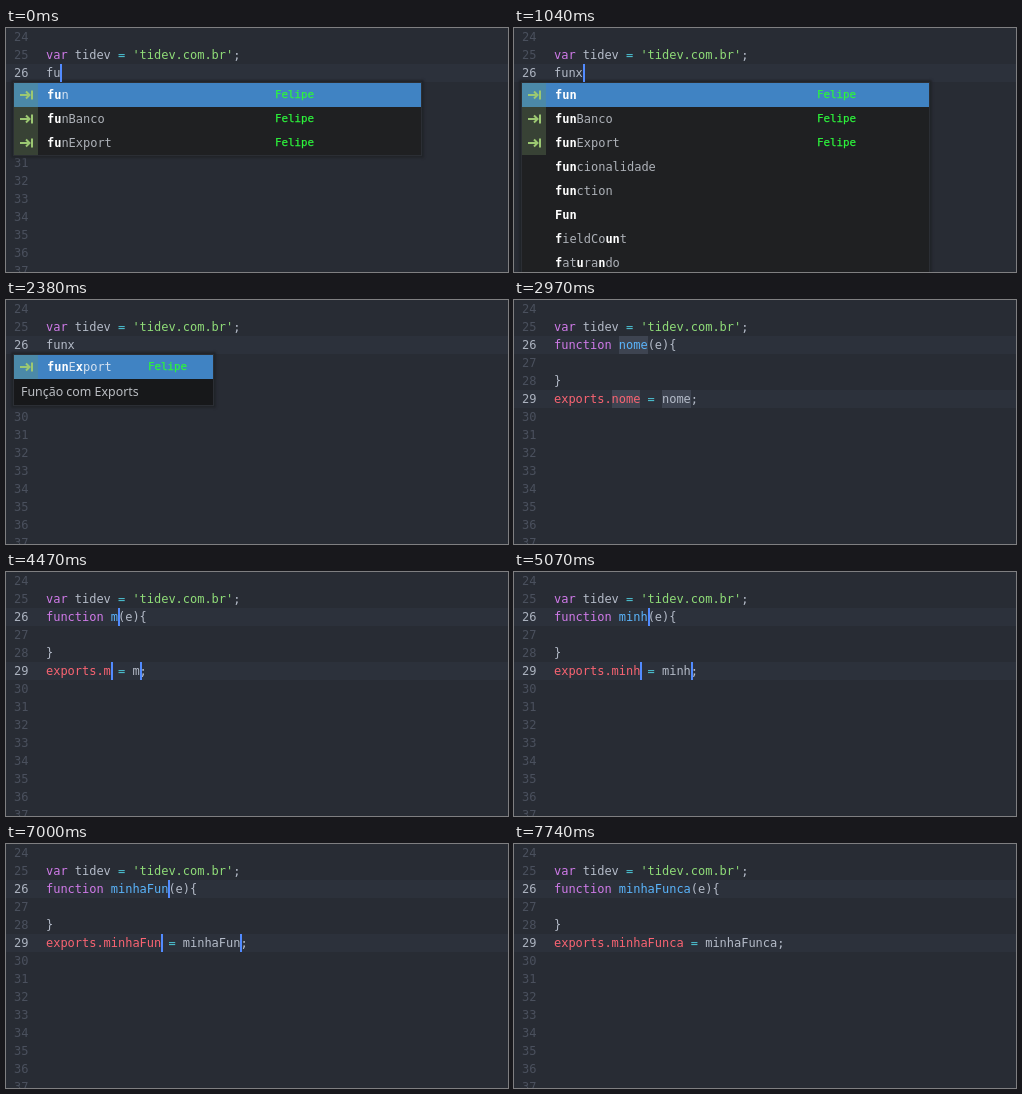
Write an HTML page that moves like this. It is 502 px wide and 244 px high and loops after 8 s.

```html
<!DOCTYPE html>
<html lang="pt-BR">
<head>
<meta charset="utf-8">
<title>Editor snippet</title>
<style>
  html, body { margin: 0; width: 100%; height: 100%; overflow: hidden; background: #282c34; }
  #stage {
    position: relative; width: 502px; height: 244px; overflow: hidden;
    background: #282c34; color: #b4bbc8;
    font: 12px/18px "DejaVu Sans Mono", monospace; letter-spacing: -.0246px; white-space: pre;
  }
  #stage div, .cursor, .sel { position: absolute; }
  .line { left: 0; width: 502px; height: 18px; }
  .active { background: #2c313b; }
  .num { left: 8px; color: #4a505d; }
  .active .num { color: #abb2bf; }
  .code { left: 40px; }
  .key { color: #cf7ae8; } .str { color: #8fdc78; } .op { color: #4cc2d2; }
  .fn { color: #5ab4fb; } .var { color: #f96472; }
  .sel { height: 18px; background: #3e4451; }
  .cursor { width: 2px; height: 18px; background: #528bff; }
  #popup {
    left: 8px; top: 55px; background: #1f2022;
    box-shadow: 0 0 0 1px #2b2e34, 0 0 2px 3px #212429;
  }
  .row { left: 0; width: 100%; height: 24px; line-height: 24px; color: #adb1b8; }
  .row b { color: #fff; }
  .picked { background: #4083c3; color: #d5e2f0; }
  .icon { left: 0; width: 24px; height: 24px; background: #384235; }
  .picked .icon { background: #4b89a8; }
  .icon svg { display: block; }
  .word { left: 33px; }
  .tag { color: #2df53c; font-size: 10.8px; letter-spacing: 0; -webkit-text-stroke: .25px; }
  .note {
    left: 0; top: 24px; width: 100%; height: 26px; background: #17181a; color: #babdc2;
    font: 12.4px/25px "Noto Sans", sans-serif; letter-spacing: 0; text-indent: 7px;
  }
</style>
</head>
<body>
<div id="stage"><div id="lines"></div><div id="popup"></div><div id="cursors"></div></div>
<script>
const LOOP = 8000, CHAR = 7.2, LEFT = 40, ROW = 18, FIRST = 24;
const AUTHOR = 'Felipe';
const WORDS = ['fun', 'funBanco', 'funExport', 'funcionalidade', 'function', 'Fun', 'fieldCount', 'faturando'];
const POPUPS = {
  short: { query: 'fu', words: WORDS.slice(0, 3), width: 407, tagX: 261 },
  full: { query: 'fun', words: WORDS, width: 407, tagX: 295 },
  single: { query: 'funx', words: ['funExport'], width: 199, tagX: 134, note: 'Função com Exports' }
};

// [start ms, typed text, cursor visible, popup]; steps without a popup show the expanded snippet
const STEPS = [
  [0, 'fu', 1, 'short'], [150, 'fun', 1, 'short'], [290, 'fun', 1, 'full'], [590, 'fun', 0, 'full'],
  [1040, 'funx', 1, 'full'], [1190, 'funx', 1, 'single'], [1640, 'funx', 0, 'single'],
  [1930, 'funx', 1, 'single'], [2380, 'funx', 0, 'single'], [2820, 'funx', 1, 'single'],
  [2970, 'nome', 0], [4470, 'm', 1], [4770, 'mi', 1], [4920, 'min', 1], [5070, 'minh', 1],
  [5370, 'minha', 1], [5810, 'minha', 0], [6260, 'minha', 1], [6400, 'minhaF', 1],
  [6700, 'minhaFu', 1], [7000, 'minhaFun', 1], [7300, 'minhaFunca', 1], [7740, 'minhaFunca', 0]
];

const $ = id => document.getElementById(id);
const span = (cls, text) => `<span class="${cls}">${text}</span>`;
const colX = col => Math.round(LEFT + col * CHAR);
const lineY = n => (n - FIRST) * ROW;
const ICON = `<svg width="24" height="24" fill="none" stroke="#9cc872" stroke-width="2">
  <path d="M6 12H15M12 8.5L15.5 12L12 15.5M18 7.5V16.5"/></svg>`;

// Bold the letters of the query, found in order
function highlight(word, query) {
  let i = 0;
  return [...word].map(c =>
    query[i] && c.toLowerCase() === query[i] ? (i++, `<b>${c}</b>`) : c).join('');
}

function popupRow(word, i, p) {
  const own = WORDS.indexOf(word) < 3;
  return `<div class="row${i ? '' : ' picked'}" style="top:${i * 24}px">` +
    (own ? `<div class="icon">${ICON}</div>` : '') +
    `<div class="word">${highlight(word, p.query)}</div>` +
    (own ? `<div class="tag" style="left:${p.tagX}px">${AUTHOR}</div>` : '') + '</div>';
}

function drawPopup(p) {
  const box = $('popup');
  box.hidden = !p;
  box.style.display = p ? 'block' : 'none';
  if (!p) return;
  box.style.width = p.width + 'px';
  box.style.height = p.words.length * 24 + (p.note ? 26 : 0) + 'px';
  box.innerHTML = p.words.map((w, i) => popupRow(w, i, p)).join('') +
    (p.note ? `<div class="note">${p.note}</div>` : '');
}

function draw([, text, cursorOn, popup]) {
  const code = { 25: span('key', 'var') + ' tidev ' + span('op', '=') + ' ' + span('str', "'tidev.com.br'") + ';' };
  let fields;
  if (popup) {
    code[26] = text;
    fields = [[26, 0]];
  } else {
    code[26] = span('key', 'function') + ' ' + span('fn', text) + '(e){';
    code[28] = '}';
    code[29] = span('var', 'exports.' + text) + ' ' + span('op', '=') + ' ' + text + ';';
    fields = [[26, 9], [29, 8], [29, 11 + text.length]];
  }
  const selected = text === 'nome';
  let html = '';
  for (let n = FIRST; n <= 37; n++) {
    const active = fields.some(f => f[0] === n);
    const marks = selected ? fields.filter(f => f[0] === n).map(f => {
      const x = colX(f[1]);
      return `<span class="sel" style="left:${x}px;width:${colX(f[1] + 4) - x}px"></span>`;
    }).join('') : '';
    html += `<div class="line${active ? ' active' : ''}" style="top:${lineY(n)}px">${marks}` +
      `<div class="num">${n}</div><div class="code">${code[n] || ''}</div></div>`;
  }
  $('lines').innerHTML = html;
  $('cursors').innerHTML = cursorOn ? fields.map(([n, col]) =>
    `<span class="cursor" style="left:${colX(col + text.length)}px;top:${lineY(n)}px"></span>`).join('') : '';
  drawPopup(POPUPS[popup]);
}

const start = performance.now();
let shown = null;
function tick() {
  const t = Math.max(0, performance.now() - start) % LOOP;
  const step = STEPS.findLast(s => s[0] <= t);
  if (step !== shown) draw(shown = step);
  requestAnimationFrame(tick);
}
tick();
</script>
</body>
</html>
```
